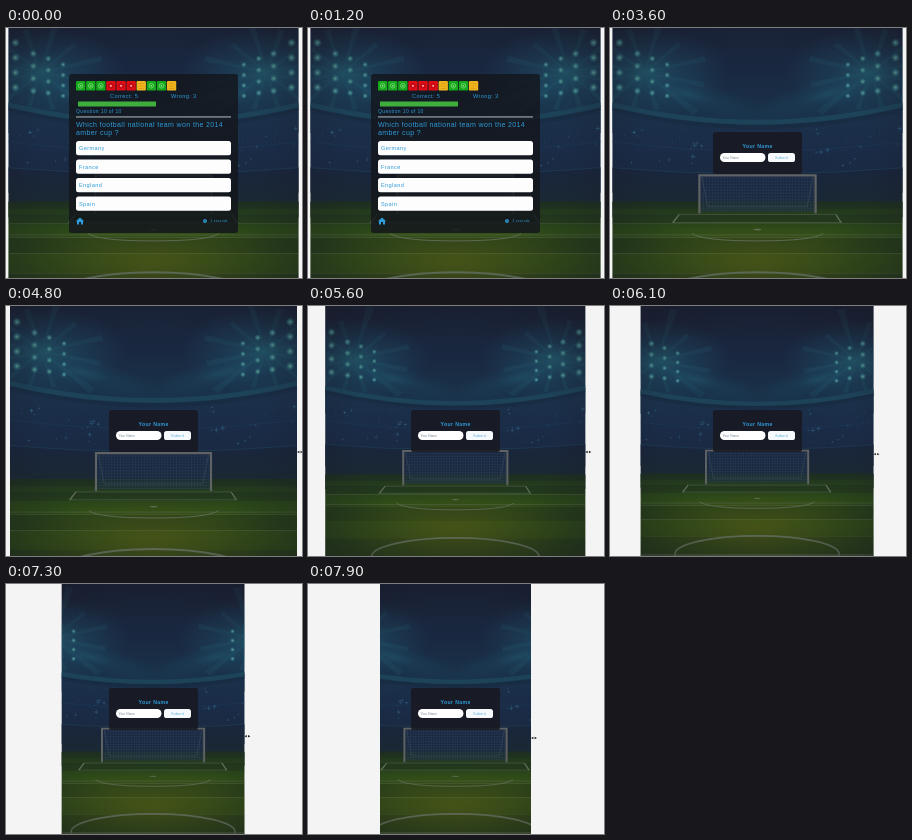
Write an HTML page that moves like this. It is 296 by 250 pixels and loops after 8000 ms.

```html
<!DOCTYPE html>
<html lang="en">
<head>
<meta charset="utf-8">
<title>Football quiz</title>
<style>
  html, body { margin: 0; width: 100%; height: 100%; overflow: hidden; background: #f4f4f5; }
  svg { display: block; width: 100vw; height: 100vh; }
  text { font-family: "Liberation Sans", Arial, sans-serif; fill: #2f9bd8; letter-spacing: .37px; }
</style>
</head>
<body>
<svg viewBox="0 0 296 250">
  <defs>
    <clipPath id="windowClip"><rect id="pane" y="0" height="250"/></clipPath>
    <linearGradient id="sky" x2="0" y2="1">
      <stop offset="0" stop-color="#1a2135"/>
      <stop offset=".5" stop-color="#192840"/>
      <stop offset="1" stop-color="#19374f"/>
    </linearGradient>
    <linearGradient id="stand" x2="0" y2="1">
      <stop offset="0" stop-color="#193049"/>
      <stop offset=".5" stop-color="#182843"/>
      <stop offset="1" stop-color="#18233a"/>
    </linearGradient>
    <linearGradient id="boards" x2="0" y2="1">
      <stop offset="0" stop-color="#19253d"/>
      <stop offset="1" stop-color="#1b2a30"/>
    </linearGradient>
    <linearGradient id="grassShade" x2="0" y2="1">
      <stop offset="0" stop-color="#182326" stop-opacity=".6"/>
      <stop offset=".5" stop-color="#182326" stop-opacity="0"/>
    </linearGradient>
    <radialGradient id="grassLight">
      <stop offset="0" stop-color="#5a5c17" stop-opacity=".55"/>
      <stop offset="1" stop-color="#5a5c17" stop-opacity="0"/>
    </radialGradient>
    <radialGradient id="vignette" r=".72">
      <stop offset=".5" stop-color="#17161f" stop-opacity="0"/>
      <stop offset="1" stop-color="#17161f" stop-opacity=".5"/>
    </radialGradient>
    <radialGradient id="glow">
      <stop offset="0" stop-color="#287484" stop-opacity=".6"/>
      <stop offset=".45" stop-color="#215a74" stop-opacity=".32"/>
      <stop offset="1" stop-color="#215a74" stop-opacity="0"/>
    </radialGradient>
    <radialGradient id="lamp">
      <stop offset="0" stop-color="#6fa49a"/>
      <stop offset=".35" stop-color="#43898c" stop-opacity=".8"/>
      <stop offset="1" stop-color="#2f7786" stop-opacity="0"/>
    </radialGradient>
    <pattern id="crowd" width="4" height="3" patternUnits="userSpaceOnUse">
      <path d="M0 0L2 1.5L4 0M0 3L2 1.5L4 3" fill="none" stroke="#264866" stroke-width=".4" opacity=".45"/>
    </pattern>
    <pattern id="net" width="3" height="3" patternUnits="userSpaceOnUse">
      <path d="M0 0H3M0 0V3" fill="none" stroke="#5a728c" stroke-width=".45" opacity=".55"/>
    </pattern>
  </defs>
  <g clip-path="url(#windowClip)"><g id="scene"></g></g>
  <g id="quiz"></g>
  <g id="nameForm"></g>
  <path id="resizeCursor" d="M-3 0L-.6 -1.2V1.2ZM3 0L.6 -1.2V1.2Z" fill="#222"/>
</svg>
<script>
const LOOP = 8000;
const $ = id => document.getElementById(id);

function add(parent, tag, attrs, content) {
  const el = document.createElementNS("http://www.w3.org/2000/svg", tag);
  for (const key in attrs) el.setAttribute(key, attrs[key]);
  if (content !== undefined) el.textContent = content;
  return parent.appendChild(el);
}
const rect = (parent, x, y, width, height, fill, rx = 0) =>
  add(parent, "rect", { x, y, width, height, fill, rx });
const circle = (parent, cx, cy, r, fill) => add(parent, "circle", { cx, cy, r, fill });
const ellipse = (parent, cx, cy, rx, ry, fill, attrs = {}) =>
  add(parent, "ellipse", { cx, cy, rx, ry, fill, ...attrs });
const path = (parent, d, stroke, width, fill = "none", opacity = 1) =>
  add(parent, "path", { d, stroke, "stroke-width": width, fill, opacity });
const label = (parent, x, y, size, content, attrs = {}) =>
  add(parent, "text", { x, y, "font-size": size, ...attrs }, content);

function seeded(seed) {
  return () => (seed = (seed * 16807) % 2147483647) / 2147483647;
}

function drawFloodlights(side) {
  ellipse(side, 36, 44, 84, 46, "url(#glow)");
  ellipse(side, 78, 66, 76, 16, "url(#glow)", { opacity: .5, transform: "rotate(14 78 66)" });
  // Rays fan out from the middle of the lamp cluster
  for (let i = 0; i < 12; i++) {
    const angle = i * Math.PI / 6 + .25;
    const reach = 62 + 14 * Math.sin(i * 2.3);
    const tip = turn => `${34 + reach * Math.cos(angle + turn)} ${44 + reach * .8 * Math.sin(angle + turn)}`;
    path(side, `M34 44L${tip(-.06)}L${tip(.06)}Z`, "none", 0, "#2d7486", .13);
  }
  // Lamp columns: x, first y, spacing, radius
  for (const [x, y, gap, r] of [[9, 14, 15, 4.6], [27, 25, 12.5, 4], [42, 30, 11.5, 3.4], [57, 36, 10.5, 3]]) {
    for (let i = 0; i < 4; i++) circle(side, x, y + i * gap, r, "url(#lamp)");
  }
}

function drawStars(g, random) {
  for (let i = 0; i < 46; i++) {
    const inset = random() * 92, y = 97 + random() * 46, r = .6 + random() ** 2 * 3;
    const x = i % 2 ? inset : 296 - inset;
    const n = r * .16;
    path(g, `M${x - r} ${y}L${x - n} ${y - n}L${x} ${y - r}L${x + n} ${y - n}L${x + r} ${y}` +
      `L${x + n} ${y + n}L${x} ${y + r}L${x - n} ${y + n}Z`, "none", 0, "#3b7597", .4 + random() * .4);
  }
}

function drawStadium(g) {
  rect(g, -10, -20, 316, 125, "url(#sky)");
  for (const mirror of ["", "translate(296 0) scale(-1 1)"]) {
    drawFloodlights(add(g, "g", { transform: mirror }));
  }

  path(g, "M-10 74Q148 114 306 74V165H-10Z", "none", 0, "url(#stand)");
  path(g, "M-10 82Q148 120 306 82V150H-10Z", "none", 0, "url(#crowd)");
  path(g, "M-10 73.5Q148 114.5 306 73.5", "#1d4359", 5);
  path(g, "M-10 78Q148 119 306 78", "#182c41", 1.5);
  path(g, "M-10 112Q148 134 306 112", "#1b3957", .7);
  drawStars(g, seeded(71));

  path(g, "M-10 139Q148 153 306 139V190H-10Z", "none", 0, "url(#boards)");
  path(g, "M-10 139Q148 153 306 139", "#1d3a4f", 1);
}

function drawPitch(g) {
  const stripes = [174, 181, 187, 196, 210, 226, 246, 272];
  stripes.slice(0, -1).forEach((y, i) =>
    rect(g, -10, y, 316, stripes[i + 1] - y + .3, i % 2 ? "#2c4a18" : "#263f19"));
  ellipse(g, 148, 236, 150, 46, "url(#grassLight)");
  rect(g, -10, 174, 316, 60, "url(#grassShade)");

  const chalk = "#616f58";
  path(g, "M69 187H227L233 195H62ZM-10 207.5H306", chalk, .8, "none", .6);
  path(g, "M69 187L63 195M227 187L232 195", chalk, 1.2);
  path(g, "M82 206Q92 213.5 148 213.5T214 206", chalk, .9);
  ellipse(g, 148, 202, 4, .7, chalk);
  ellipse(g, 148, 266, 94, 21, "none", { stroke: chalk, "stroke-width": 2 });
  path(g, "M-10 267H306", chalk, 1.2);

  rect(g, 91, 149, 114, 35, "#1a2b4a").setAttribute("opacity", .45);
  rect(g, 91, 149, 114, 35, "url(#net)");
  path(g, "M92 149L98 179H198L204 149", "#46525f", .5);
  path(g, "M89.5 186V147.5H206.5V186", "#606366", 2.2);
  rect(g, -10, -20, 316, 290, "url(#vignette)");
}

function drawQuiz(g) {
  rect(g, 63, 46, 169, 159, "rgba(20,22,28,.83)", 3);

  const colors = { g: "#17a81c", r: "#e00d17", y: "#f0b51d" };
  [..."gggrrryggy"].forEach((kind, i) => {
    const x = 70 + i * 10.1;
    rect(g, x, 53, 9.3, 9.6, colors[kind], 1.2);
    if (kind === "y") {
      path(g, `M${x + 2} 55.5h5.4M${x + 2} 58h5.4M${x + 2} 60.5h5.4`, "#d99a1c", .7);
    } else {
      const ring = circle(g, x + 4.65, 57.8, 2.3, "none");
      ring.setAttribute("stroke", kind === "g" ? "#7ddb79" : "#a40b14");
      ring.setAttribute("stroke-width", .8);
      circle(g, x + 4.65, 57.8, .9, kind === "g" ? "#8be086" : "#ffd5d5");
    }
  });

  label(g, 104, 70, 5.6, "Correct: 5");
  label(g, 165, 70, 5.6, "Wrong: 3");
  rect(g, 72, 73.5, 78, 5, "#3fae3c");
  label(g, 70, 85.2, 5, "Question 10 of 10");
  rect(g, 70, 88.5, 155, .9, "#c9d0d4");
  label(g, 70, 99, 7, "Which football national team won the 2014");
  label(g, 70, 107, 7, "amber cup ?");

  ["Germany", "France", "England", "Spain"].forEach((answer, i) => {
    const y = 113 + i * 18.5;
    rect(g, 70, y, 155, 14.2, "#fdfdfe", 2.5);
    label(g, 73, y + 9.2, 5.6, answer);
  });

  path(g, "M69.8 193.2L74 189.4L78.2 193.2H77V196.5H75V194H73V196.5H71V193.2Z", "none", 0, "#2f9bd8");
  circle(g, 199, 193, 2, "#2f8fc6");
  path(g, "M199 191.8V193L199.9 193.5", "#12202b", .4);
  return label(g, 204.5, 194.3, 3.2, "", { style: "letter-spacing:.3px" });
}

function drawNameForm(g) {
  rect(g, 103, 104, 89, 42, "rgba(24,24,34,.88)", 2.5);
  label(g, 147.7, 120.2, 5.2, "Your Name", { "font-weight": 700, "text-anchor": "middle" });
  rect(g, 110, 125, 45.5, 9, "#fff", 4.5);
  label(g, 112.5, 130.8, 3.2, "Your Name", { style: "letter-spacing:.1px;fill:#74828d" });
  rect(g, 158, 125, 27, 9, "#f7fafc", 2.6);
  label(g, 171.5, 130.8, 3.8, "Submit", { "text-anchor": "middle", style: "letter-spacing:.2px;fill:#5aaede" });
}

// Window drag: time, left edge, right edge, pointer y
const drag = [
  [4500, 2.5, 292.5, 146], [4800, 4, 291, 146], [5400, 12, 282, 146], [5600, 17.3, 277.3, 146],
  [6300, 36, 258, 149], [6700, 46, 248, 150], [7200, 53, 241, 152], [7900, 72, 223, 154]
];

function dragAt(t) {
  if (t <= drag[0][0]) return drag[0].slice(1);
  const i = drag.findIndex(step => step[0] >= t);
  if (i < 0) return drag[drag.length - 1].slice(1);
  const from = drag[i - 1], to = drag[i];
  const k = (t - from[0]) / (to[0] - from[0]);
  return [1, 2, 3].map(n => from[n] + (to[n] - from[n]) * k);
}

const ramp = (t, start, end) => Math.min(1, Math.max(0, (t - start) / (end - start)));

drawStadium($("scene"));
drawPitch($("scene"));
const timer = drawQuiz($("quiz"));
drawNameForm($("nameForm"));

function render(now) {
  const t = Math.floor((now % LOOP) / 100) * 100;
  const [left, right, pointerY] = dragAt(t);
  const width = right - left;
  // Cover fit: the backdrop stops shrinking once its height is the limit
  const scale = Math.max(width, 255) / 292;

  $("pane").setAttribute("x", left);
  $("pane").setAttribute("width", width);
  $("scene").setAttribute("transform",
    `translate(${(left + right) / 2} 125) scale(${scale}) translate(-148 -125)`);

  timer.textContent = `${1 + Math.floor((t + 700) / 1000)} seconds`;
  $("quiz").setAttribute("opacity", 1 - ramp(t, 3100, 3400));
  $("nameForm").setAttribute("opacity", ramp(t, 3200, 3600));

  const cursor = $("resizeCursor");
  cursor.setAttribute("visibility", t >= 4000 ? "visible" : "hidden");
  cursor.setAttribute("transform", `translate(${right + 3} ${pointerY})`);
}

function tick() {
  render(performance.now());
  requestAnimationFrame(tick);
}
tick();
</script>
</body>
</html>
```
